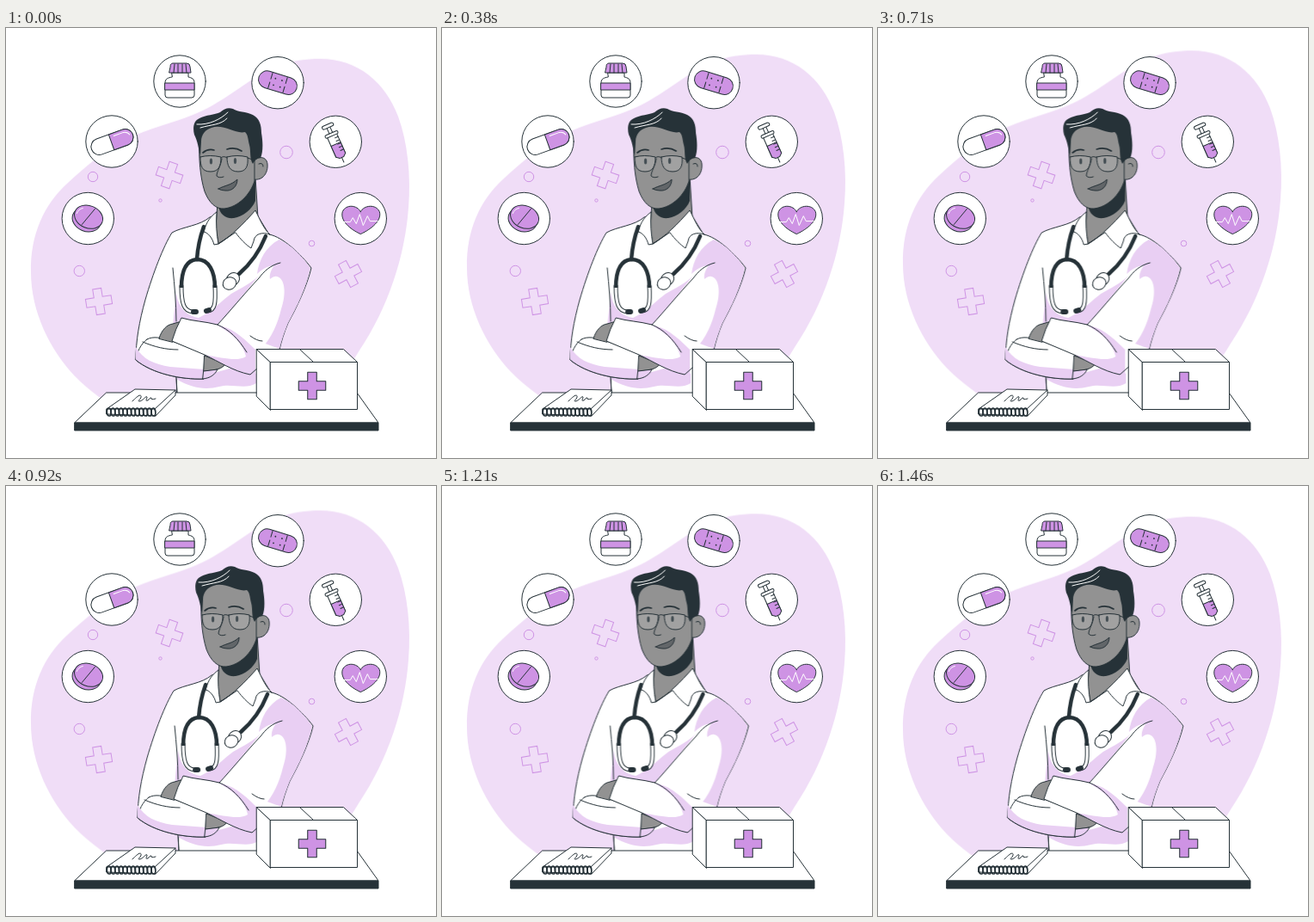
An HTML page that plays this animation: 500 by 500 pixels, repeating every 1500 ms.

```html
<!DOCTYPE html>
<html lang="en">
<head>
<meta charset="utf-8">
<title>Doctor</title>
<style>
  html, body { margin: 0; width: 100%; height: 100%; overflow: hidden; background: #fff; }
  svg { display: block; width: 100%; height: 100%; }
  .ink { stroke: #263238; stroke-width: 1; stroke-linecap: round; stroke-linejoin: round; fill: none; }
  .white { fill: #fff; }
  .dark { fill: #263238; }
  .purple { fill: #ce93e4; }
  .pale { fill: #e9cff3; }
  .skin { fill: #929292; }
  .hole { fill: none; stroke: #ce93e4; stroke-width: 1; }
  .shine { fill: none; stroke: #fff; stroke-width: 1; stroke-linecap: round; stroke-linejoin: round; }
  .blob { fill: #f0ddf7; animation: float 1.5s linear -15ms infinite; }
  .doctor { animation: shake 1.5s linear -15ms infinite; }
  @keyframes float {
    50% { transform: translateY(-10px); }
  }
  @keyframes shake {
    0%, 100% { transform: translateX(0); }
    10%, 90% { transform: translateX(-1px); }
    20%, 80% { transform: translateX(2px); }
    30%, 50%, 70% { transform: translateX(-4px); }
    40%, 60% { transform: translateX(4px); }
  }
</style>
</head>
<body>
<svg viewBox="0 0 500 500">
  <defs>
    <path id="plus" d="M-5-15H5V-5H15V5H5V15H-5V5H-15V-5H-5Z"/>
    <circle id="disc" r="30.2" class="ink white"/>
    <path id="ring" class="ink" d="M1 9C-2.500 9-2.500 0 .5 0S4 7 2 9" style="stroke-width:1.700"/>
  </defs>

  <path class="blob" d="M29 284C28 240 45 205 70 182C95 159 117 140 150 125C174 114 202 109 229 96C262 80 284 57 317 44C333 38 349 36 365 36C409 36 441 63 456 103C467 133 471 172 468 209C464 266 444 326 411 375C402 390 392 405 380 420L370 455H140C119 435 98 424 80 405C51 374 29 330 29 284Z"/>

  <g class="hole">
    <use href="#plus" transform="translate(190 171) rotate(19)"/>
    <use href="#plus" transform="translate(108 318) rotate(-9)"/>
    <use href="#plus" transform="translate(398 286) rotate(-28)"/>
    <circle cx="101" cy="173" r="5.700"/>
    <circle cx="326" cy="144.500" r="7.300"/>
    <circle cx="179.500" cy="200.500" r="1.700"/>
    <circle cx="85.300" cy="282.500" r="6.200"/>
    <circle cx="355.500" cy="250.500" r="3.300"/>
  </g>

  <!-- bottle -->
  <g transform="translate(202 62)">
    <use href="#disc"/>
    <path class="ink white" d="M-9-10H10V-5C14-4 17-3 17 2V16Q17 19 14 19H-14Q-17 19-17 16V2C-17-3-14-4-9-5Z"/>
    <path class="ink purple" d="M-17 2H17V10H-17Z"/>
    <path class="ink purple" d="M-11-17Q-11-21-8-21H8Q12-21 12-17L13-10H-12Z"/>
    <path class="ink" d="M-6-20L-7-10M-2-20V-10M3-20V-10M7-20L8-10"/>
  </g>

  <!-- plaster -->
  <g transform="translate(316 63.700)">
    <use href="#disc"/>
    <g transform="rotate(17)">
      <rect class="ink purple" x="-23" y="-10" width="46" height="20" rx="10"/>
      <path class="ink" d="M-9-9V9M9-9V9" stroke-dasharray="7 4"/>
      <g class="dark">
        <circle cx="-4" cy="-4" r=".9"/><circle cx="4" cy="-4" r=".9"/>
        <circle cx="-4" cy="4" r=".9"/><circle cx="4" cy="4" r=".9"/>
      </g>
    </g>
  </g>

  <!-- capsule -->
  <g transform="translate(123 132)">
    <use href="#disc"/>
    <g transform="translate(.5 .5) rotate(-20)">
      <rect class="ink white" x="-25.500" y="-9.500" width="51" height="19" rx="9.500"/>
      <path class="ink purple" d="M-1-9.500H16A9.500 9.500 0 0 1 16 9.500H-1Z"/>
      <path class="shine" d="M4-6H16Q21-5 22-1"/>
    </g>
  </g>

  <!-- syringe -->
  <g transform="translate(383.300 132.300)">
    <use href="#disc"/>
    <g transform="translate(-1 0) rotate(-24)">
      <path class="ink" d="M0 19V26"/>
      <path class="ink white" d="M-2-19H2V-9H-2Z"/>
      <rect class="ink white" x="-7" y="-22" width="14" height="4" rx="2"/>
      <path class="ink white" d="M-6-9H6V17H-6Z"/>
      <path class="ink purple" d="M-6 3H6V17L2.500 20H-2.500L-6 17Z"/>
      <rect class="ink white" x="-8" y="-11" width="16" height="3.500" rx="1.700"/>
      <path class="ink" d="M6-4H2M6 0H2M6 4H2M6 8H2M6 12H2"/>
    </g>
  </g>

  <!-- heart -->
  <g transform="translate(412.300 221.600)">
    <use href="#disc"/>
    <path class="ink purple" d="M0-8C-4-16-17-17-21-8C-24 2-13 12 0 18C13 12 25 2 22-8C18-17 4-16 0-8Z"/>
    <path class="shine" d="M-20 4H-12L-9-1L-5 6L-1-5L3 8L8-3L11 3H20"/>
  </g>

  <!-- tablet -->
  <g transform="translate(95.300 221.500)">
    <use href="#disc"/>
    <g transform="rotate(22)">
      <ellipse class="ink purple" cx="-1" cy="2" rx="17" ry="13.500"/>
      <ellipse class="ink purple" cx="0" cy="-2" rx="17" ry="13"/>
    </g>
    <path class="ink" d="M8-11L-7 7"/>
    <path class="shine" d="M-13-6Q-11-11-6-12"/>
  </g>

  <g class="doctor">
    <!-- coat -->
    <path class="ink white" d="M237 220C226 230 205 231 193 238C183 254 171 285 162 316C155 341 151 364 151 386C160 394 180 401 198 405L199 430H300L318 374C320 365 323 355 328 343C338 325 350 300 355 279C343 263 322 243 306 240L290 214Z"/>
    <path class="pale" d="M318 246C333 253 345 266 354 279C350 300 338 325 328 343C323 355 320 365 318 373H297C309 360 316 344 320 327C326 310 325 291 315 289C311 288 309 291 307 292C306 286 309 280 312 276C303 277 297 281 292 286C294 270 302 254 318 246Z"/>
    <path class="pale" d="M198 307C200 326 211 335 224 337C240 330 252 316 262 309C274 302 285 297 294 288C277 309 260 330 246 345L204 338L194 347Z"/>
    <path class="pale" d="M198 404L246 400L270 393L291 402V413C279 421 263 413 248 417C232 421 216 419 198 408Z"/>
    <path class="ink" d="M194 279C196 300 198 320 198 341M198 405L199 424M319 273C307 276 300 283 294 291C277 309 260 330 246 345"/>

    <!-- folded arms -->
    <path class="ink white" d="M164 362C171 358 181 360 193 364L232 379L230 408C204 409 170 402 151 386C152 377 157 367 164 362Z"/>
    <path class="pale" d="M151 371C159 385 172 391 191 394L231 397L230 408C204 409 170 402 151 386Z"/>
    <path class="ink" d="M151 386C170 402 204 409 230 408L232 379M159 365C173 371 186 374 200 374"/>
    <path class="ink skin" d="M178 361C181 351 187 345 194 344L204 341L194 365Z"/>
    <path class="ink skin" d="M231 381L255 391C251 396 246 398 230 399Z"/>
    <path class="ink pale" d="M230 399L246 397C243 403 238 407 229 408Z"/>
    <path class="white" d="M204 337C227 343 258 344 280 359L318 373C306 389 294 400 284 403C264 399 248 388 231 380L193 364C196 354 200 345 204 337Z"/>
    <path class="pale" d="M246 346C260 347 273 357 290 374V402L284 403C264 399 248 388 231 380C253 384 270 388 279 382C276 366 261 354 246 346Z"/>
    <path class="ink" d="M246 345C231 341 217 341 204 337Q197 350 193 364L231 380C248 388 264 399 284 403L318 373M246 345C260 351 270 361 280 377M284 358Q292 364 298 364"/>

    <!-- neck and collar -->
    <path class="ink skin" d="M246 203L244 232L247 251C260 243 276 229 293 221L290 173Z"/>
    <path class="dark" d="M247 206C248 217 256 222 265 221C276 219 286 211 290 201V176C282 191 265 208 247 206Z"/>
    <path class="ink white" d="M245 214C238 219 233 225 230 237C235 238 240 244 242 252L247 251C245 240 244 228 245 214Z"/>
    <path class="ink white" d="M247 251C262 242 276 228 290 212C296 224 300 234 307 240C298 237 289 239 288 248L285 256C279 252 273 246 267 238Z"/>

    <!-- stethoscope -->
    <g fill="none" stroke-linecap="round">
      <path stroke="#263238" stroke-width="4.500" d="M230 231C226 242 223 255 222 269M302 242C296 257 286 273 271 286"/>
      <path stroke="#263238" stroke-width="5" d="M204 300C204 321 207 329 217 330M243 300C244 320 243 328 235 329"/>
      <path stroke="#fff" stroke-width="3" d="M204 300C204 321 207 329 217 330M243 300C244 320 243 328 235 329"/>
      <path stroke="#263238" stroke-width="4.500" stroke-linecap="butt" d="M204 302C204 282 210 270 222 269C236 269 243 283 243 302"/>
      <path stroke="#263238" stroke-width="6" d="M218 330L221 330M233 329L236 328"/>
    </g>
    <ellipse class="ink white" cx="264" cy="292" rx="8" ry="7" transform="rotate(-40 264 292)"/>
    <ellipse class="ink white" cx="260" cy="297" rx="8" ry="7" transform="rotate(-30 260 297)"/>

    <!-- head -->
    <path class="ink skin" d="M287 156C293 148 303 149 304 158C305 168 299 178 288 176Z"/>
    <path class="ink skin" d="M225 130C224 153 226 174 231 190C236 203 244 211 254 210C270 208 284 194 289 178V130L270 108H235Z"/>
    <path class="dark" d="M226 150C224 140 223 132 219 124C217 116 218 108 225 105C232 101 243 101 249 98C254 94 258 92 264 94C270 98 279 97 287 101C295 105 297 113 297 122C299 133 299 145 296 151C292 151 289 154 287 158C283 152 285 143 283 136C281 129 282 125 278 121C267 124 253 111 239 116C232 118 227 124 227 132Z"/>
    <path class="shine" d="M222 112C236 113 250 106 258 98M226 116C239 112 250 113 257 105"/>
    <path class="ink" style="stroke-width:1.700" d="M229 145Q235 140 242 142M257 141Q266 138 274 143"/>
    <ellipse class="dark" cx="238.500" cy="155" rx="1.600" ry="3.600"/>
    <ellipse class="dark" cx="266.500" cy="154.500" rx="1.600" ry="3.600"/>
    <path class="ink" d="M251 152C250 160 245 167 245 172Q248 175 253 173M294 158Q299 156 299 161"/>
    <g class="ink">
      <path style="fill:#fff2" d="M226 150Q237 147 250 150C250 161 247 167 238 167C228 167 226 161 226 150ZM257 150Q269 147 281 150C282 161 279 167 270 167C260 167 257 160 257 150Z"/>
      <path d="M250 151Q253 148 257 151M281 151L289 154"/>
    </g>
    <path class="ink" style="fill:#626669" d="M247 187C254 183 262 183 269 176C269 184 263 190 255 189Q250 189 247 187Z"/>
  </g>

  <!-- table -->
  <path class="ink white" d="M117 424H408L433 459H80Z"/>
  <path class="ink dark" d="M80 459H433V468H80Z"/>

  <!-- notepad -->
  <path class="ink white" d="M117 443L150 420L197 421V427L174 451L117 449Z"/>
  <path class="ink" d="M117 443H173L197 421M173 443L174 451"/>
  <path class="ink" d="M147 434C151 430 156 425 157 428C158 431 152 434 155 434C159 434 163 427 164 429C164 432 161 434 165 433Q168 429 169 430Q168 433 174 431"/>
  <g id="rings"></g>

  <!-- first-aid box -->
  <g class="ink white" transform="translate(.5 .5)">
    <path d="M291 373L307 388V444L291 428Z"/>
    <path d="M291 373H392L408 388H307Z"/>
    <path d="M307 388H408V443H307Z"/>
    <path d="M341 373L357 388"/>
  </g>
  <use href="#plus" class="ink purple" transform="translate(356 416) scale(1.050)"/>
</svg>
<script>
  const rings = document.getElementById('rings');
  for (let i = 0; i < 12; i++) {
    const ring = document.createElementNS('http://www.w3.org/2000/svg', 'use');
    ring.setAttribute('href', '#ring');
    ring.setAttribute('transform', `translate(${119 + i * 4.7} 442)`);
    rings.append(ring);
  }
</script>
</body>
</html>
```
